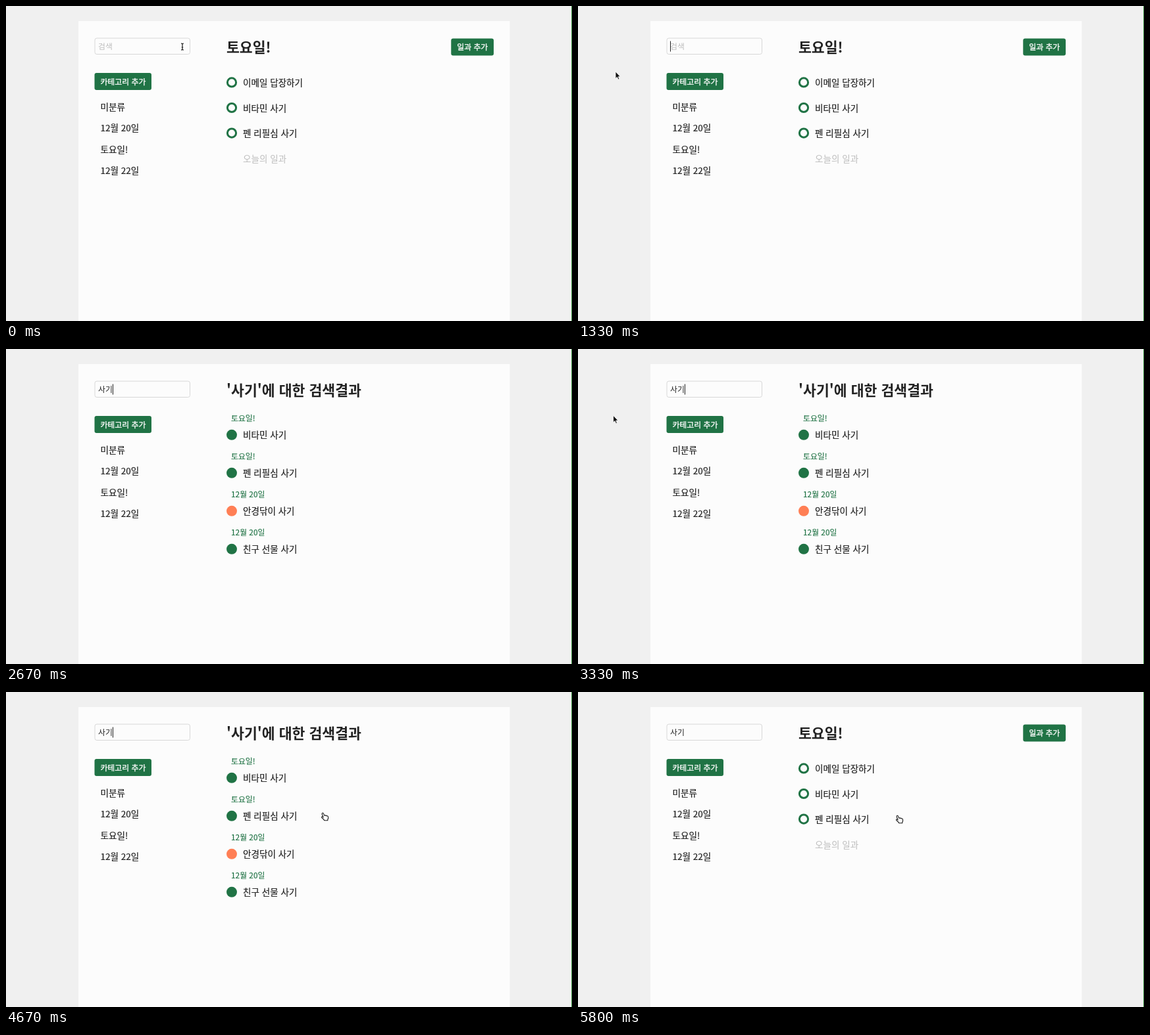
An HTML page that plays this animation: 860 px wide and 480 px high, repeating every 5.87 s.

```html
<!DOCTYPE html>
<html lang="ko">
<head>
<meta charset="utf-8">
<title>할 일 검색</title>
<style>
  html, body { margin: 0; height: 100%; overflow: hidden; background: #f0f0f0; }
  svg { display: block; font: 13.55px "Noto Sans CJK KR", "Noto Sans KR", sans-serif; fill: #222; }
  text { white-space: pre; }
  .item { stroke: #222; stroke-width: .2; }
  .title { font-size: 21.6px; font-weight: 700; }
  .button { font-size: 11.9px; fill: #fcfcfc; stroke: #fcfcfc; stroke-width: .35; }
  .label { font-size: 11.85px; fill: #207345; stroke: #207345; stroke-width: .15; }
  .field { font-size: 11.9px; }
  .hint { fill: #bdbdbd; }
  .green { fill: #207345; }
  .orange { fill: #ff7f55; }
  .ring { fill: #fcfcfc; stroke: #207345; stroke-width: 3; }
  .pointer { fill: #fff; stroke: #1a1a1a; stroke-width: 1.1; stroke-linejoin: round; }
</style>
</head>
<body>
<svg width="860" height="480" viewBox="0 0 860 480">
  <rect width="860" height="480" fill="#f0f0f0"/>
  <rect x="110" y="23" width="655.5" height="457" fill="#fcfcfc"/>
  <rect x="859" width="1" height="480" fill="#459c4a"/>
  <rect x="135" y="49" width="144.5" height="24.5" rx="3" fill="#fcfcfc" stroke="#d8d8d8"/>
  <g id="side"></g>
  <g id="view"></g>
</svg>
<script>
const LOOP = 5870;
const side = document.getElementById('side');
const view = document.getElementById('view');

const text = (x, y, s, cls) => `<text x="${x}" y="${y}" class="${cls}">${s}</text>`;
const dot = (y, r, cls) => `<circle cx="343" cy="${y}" r="${r}" class="${cls}"/>`;
const button = (x, y, w, s) =>
  `<rect x="${x}" y="${y}" width="${w}" height="26" rx="3" class="green"/>` +
  text(x + 8.9, y + 17.8, s, 'button');

side.innerHTML = button(134.5, 102, 86.5, '카테고리 추가') +
  ['미분류', '12월 20일', '토요일!', '12월 22일']
    .map((s, i) => text(143.5, 159 + 32.3 * i, s, 'item')).join('');

const todos = ['이메일 답장하기', '비타민 사기', '펜 리필심 사기'];
const dayView = text(335, 71, '토요일!', 'title') +
  button(676.3, 49.5, 64.7, '일과 추가') +
  todos.map((s, i) =>
    dot(116.4 + 38.6 * i, 6.6, 'ring') + text(360, 122 + 38.6 * i, s, 'item')).join('') +
  text(360, 237.8, '오늘의 일과', 'hint');

const found = [
  ['토요일!', todos[1], 'green'],
  ['토요일!', todos[2], 'green'],
  ['12월 20일', '안경닦이 사기', 'orange'],
  ['12월 20일', '친구 선물 사기', 'green']
];
const resultView = query => text(335, 71, `'${query}'에 대한 검색결과`, 'title') +
  found.filter(row => row[1].includes(query)).map(([day, name, color], i) => {
    const y = 58 * i;
    return text(342, 110.4 + y, day, 'label') + dot(130.8 + y, 8, color) +
      text(360, 136.4 + y, name, 'item');
  }).join('');

// Typing: time and the text in the field, syllable by syllable
const typing = [[1450, 'ㅅ'], [1570, '사'], [1690, '삭'], [1800, '사기']];
const COMMIT = 2300, FOCUS = 270, CLICK = 5370;

function field(t, query) {
  let out = text(140, 66, query || '검색', query ? 'field' : 'field hint');
  const composing = query && t < COMMIT;
  const since = t - (t < COMMIT ? FOCUS : COMMIT);
  const focused = t >= FOCUS && t < CLICK;
  const end = 140 + 11 * query.length;
  if (composing) out += `<rect x="${end - 11}" y="68" width="11" height="1"/>`;
  if (focused && (composing || since % 1000 < 500))
    out += `<rect x="${end}" y="53.5" width="1" height="16"/>`;
  return out;
}

// Mouse path: time, x, y
const path = [
  [0, 268, 62], [420, 268, 62], [900, 57, 101], [3250, 57, 101], [3380, 52, 103],
  [3720, 470, 188], [3900, 477, 190], [4250, 477, 190], [4550, 484.5, 190],
  [5050, 484.5, 190], [5250, 488.5, 194], [LOOP, 488.5, 194]
];

function mouse(t) {
  if (t >= typing[0][0] && t < 3250) return '';
  const i = path.findIndex(p => p[0] > t);
  const [a, b] = [path[i - 1], path[i]];
  const u = (t - a[0]) / (b[0] - a[0]);
  const k = u * u * (3 - 2 * u);
  const x = a[1] + (b[1] - a[1]) * k, y = a[2] + (b[2] - a[2]) * k;
  let shape;
  if (x > 335) {
    shape = '<path class="pointer" d="M-2.3 1.2L-4.3-3.7Q-4.7-5.4-3.5-5.7Q-2.5-5.8-2-4.6L-.8-1.8Q.2-2.6 1-1.6Q2-2.2 2.8-1.1Q4.6-1.6 5 .3Q5.5 2.5 4.3 4.2V5.8H-.8Q-1.6 4-4.2 2Q-5.6.5-4.5 0Q-3.5-.2-2.3 1.2Z"/>';
  } else if (x > 135 && x < 280 && y > 49 && y < 74) {
    shape = '<path d="M-2-5Q0-5 0-4Q0-5 2-5M0-4V4M-2 5Q0 5 0 4Q0 5 2 5M-1.2 1H1.2" fill="none" stroke="#1a1a1a" stroke-width="1.2"/>';
  } else {
    shape = '<path d="M0-1V9.5L2.4 7.3L4.1 11.1L5.8 10.3L4.2 6.7H7.3Z" fill="#111" stroke="#fff" stroke-width=".8"/>';
  }
  return `<g transform="translate(${x} ${y})">${shape}</g>`;
}

let shown;
function frame(now) {
  const t = now % LOOP;
  const query = typing.reduce((s, [at, value]) => t >= at ? value : s, '');
  const markup = (query && t < CLICK ? resultView(query) : dayView) + field(t, query) + mouse(t);
  if (markup !== shown) view.innerHTML = shown = markup;
}

const start = performance.now();
function tick() {
  frame(performance.now() - start);
  requestAnimationFrame(tick);
}
tick();
</script>
</body>
</html>
```
